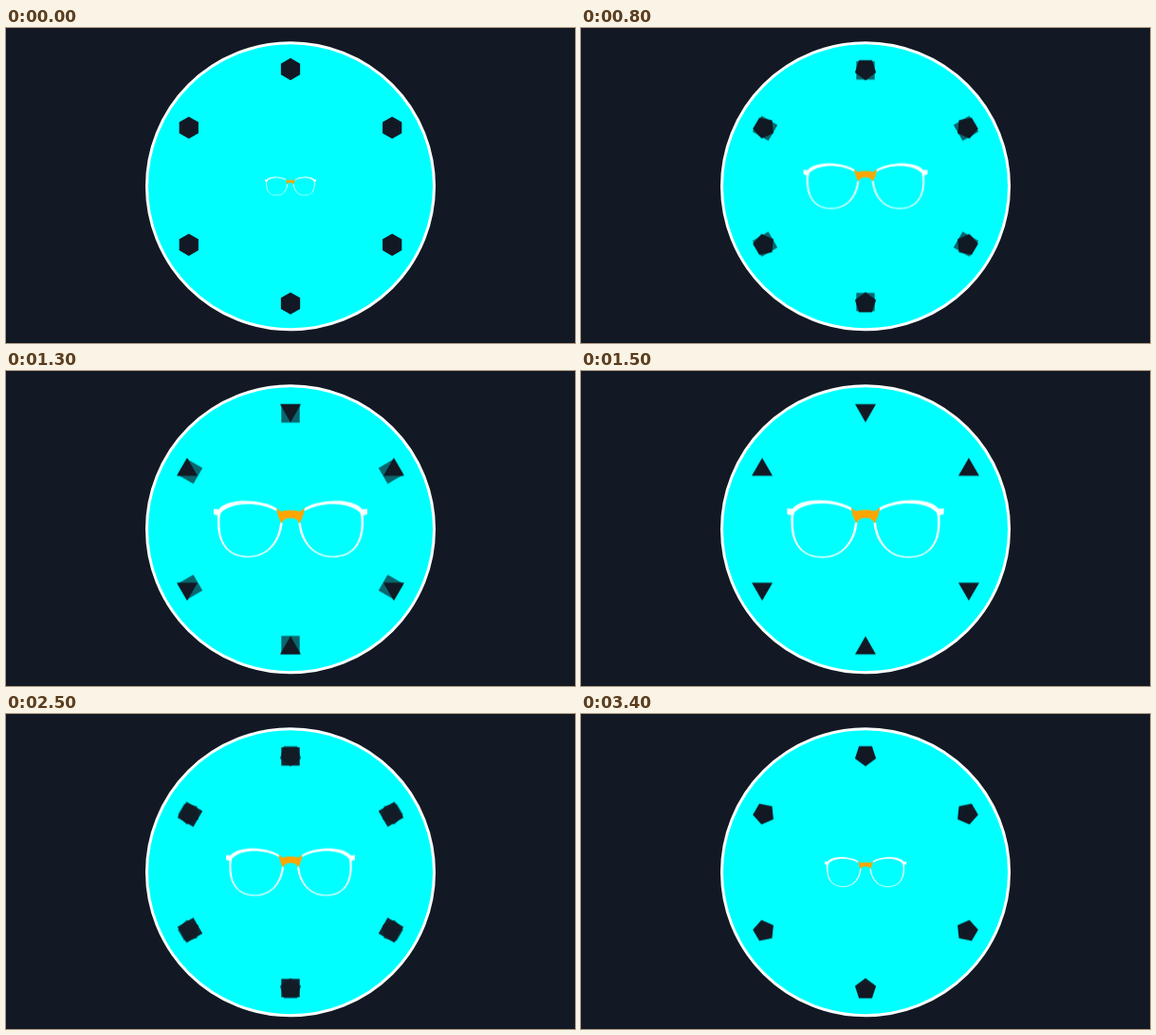
These frames come from a looping animation (600x333 px, 3.5 s). An HTML page:

```html
<!DOCTYPE html>
<html lang="en">
<head>
<meta charset="utf-8">
<title>Pulsing glasses</title>
<style>
html, body { margin: 0; width: 100%; height: 100%; overflow: hidden; background: #121924; }
svg { display: block; width: 100vw; height: 100vh; }
</style>
</head>
<body>
<svg viewBox="-300 -167.3 600 333">
  <defs>
    <g id="half" fill="#fff">
      <path d="M8.5-7C10 12 23 30 45 30C67 30 78 15 78-7C78-15 78-19 75-22L72-21C75-18 75.5-14 75.5-7C75.5 15 66 28.6 45 28.6C24 28.6 13 12 11-7Z"/>
      <path d="M14-22C30-32.5 66-34 76-22L74-18C62-30 32-29.5 15-19.5Z"/>
      <path d="M73-22Q78-21 82-22V-16Q79-14.5 76-15Z"/>
    </g>
  </defs>
  <circle r="151.5" fill="#0ff" stroke="#fff" stroke-width="3"/>
  <g id="ring" fill="#121924"></g>
  <g id="glasses">
    <use href="#half"/>
    <use href="#half" transform="scale(-1 1)"/>
    <path d="M-15-23Q-13-20.5-10-19Q0-21.5 10-19Q13-20.5 15-23Q14-13 9.5-6.5Q7-12 0-12Q-7-12-9.5-6.5Q-14-13-15-23Z" fill="orange"/>
  </g>
</svg>
<script>
const LOOP = 3500, STEP = 100;
const RISE = 1800, TURN = 1750, LOW = 3100, FALL_SPEED = 1.42;
const SWAPS = [265, 830, 1270], FADE = 300;
const ring = document.getElementById("ring");
const glasses = document.getElementById("glasses");

const clamp = x => Math.max(0, Math.min(1, x));

// Regular polygon with one corner towards the centre of the ring
function polygon(sides, radius, y, turn = 0) {
  return Array.from({ length: sides }, (_, i) => {
    const a = 2 * Math.PI * (i + turn) / sides;
    return [radius * Math.sin(a), y + radius * Math.cos(a)];
  }).join(" ");
}

const shapes = [
  polygon(6, 11.7, -123.8),
  polygon(5, 11.7, -123.8),
  polygon(4, 13.7, -122.4, 0.5),
  polygon(3, 12.7, -125.8)
];
const layers = shapes.map(points => {
  const g = document.createElementNS("http://www.w3.org/2000/svg", "g");
  for (let i = 0; i < 6; i++)
    g.innerHTML += `<polygon points="${points}" transform="rotate(${i * 60})"/>`;
  return ring.appendChild(g);
});

function draw(now) {
  const t = Math.floor(now % LOOP / STEP) * STEP;
  // The pulse rises, then runs back faster and bounces at LOW
  const pulse = t < TURN ? t : Math.abs(LOW - t) * FALL_SPEED;

  const eased = 1 - (1 - clamp(pulse / RISE)) ** 1.65;
  const size = 27 + 56 * (0.5 - 0.5 * Math.cos(Math.PI * eased));
  glasses.setAttribute("transform", `scale(${size / 82})`);

  // 0 hexagon, 1 pentagon, 2 square, 3 triangle; neighbours overlap while fading
  const morph = SWAPS.reduce((sum, at) => sum + clamp((pulse - at) / FADE + 0.5), 0);
  layers.forEach((layer, i) =>
    layer.setAttribute("opacity", clamp(1.65 * (1 - Math.abs(morph - i)))));

  requestAnimationFrame(draw);
}
draw(performance.now());
</script>
</body>
</html>
```
